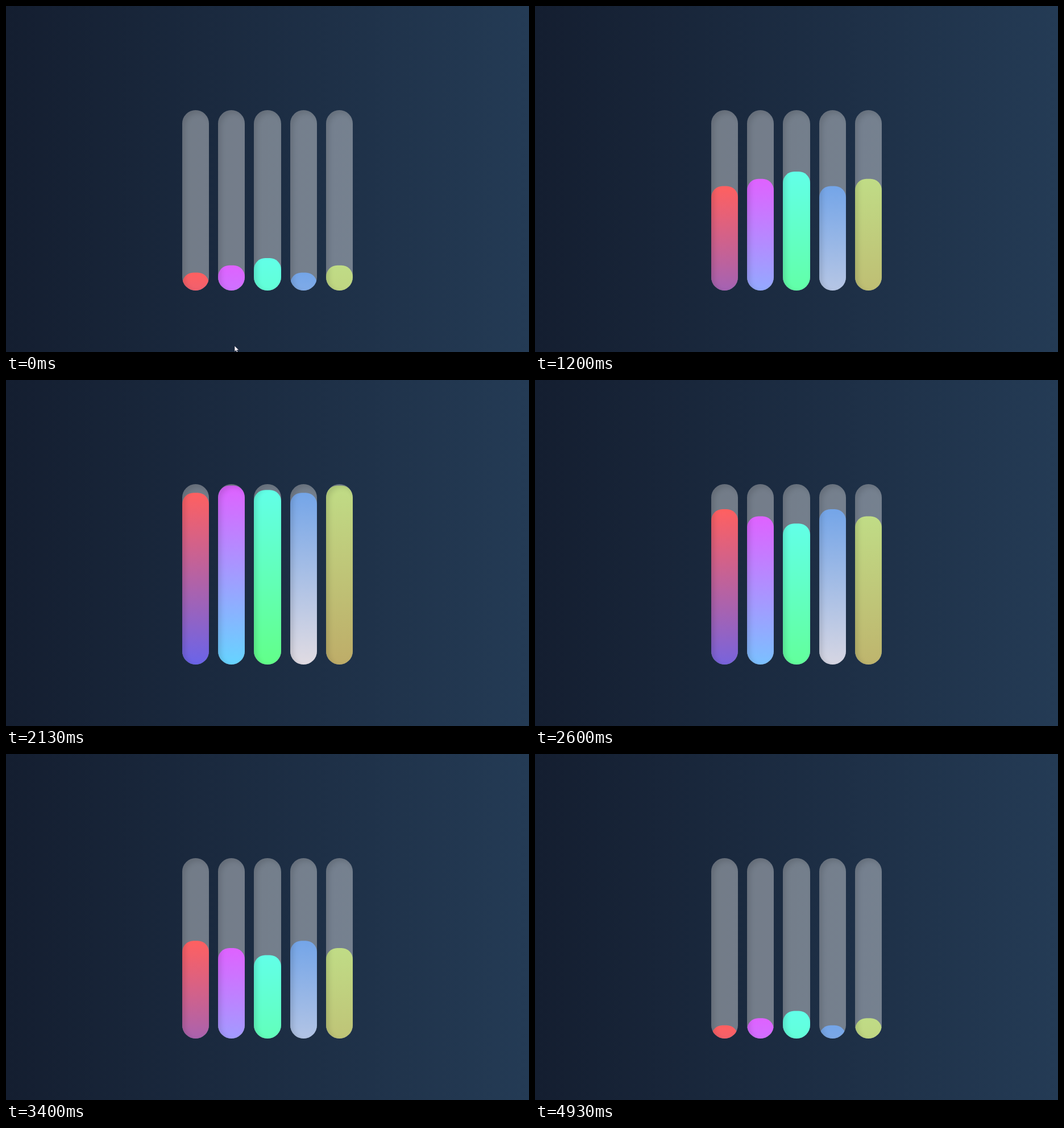
Write an HTML page that moves like this. It is 920 by 608 pixels and loops after 4990 ms.

```html
<!DOCTYPE html>
<html lang="en">
<head>
<meta charset="utf-8">
<title>Colour bars</title>
<style>
  @property --n {
    syntax: "<number>";
    inherits: true;
    initial-value: 0;
  }

  html, body {
    margin: 0;
    width: 100%;
    height: 100%;
    overflow: hidden;
  }

  body {
    position: relative;
    background: linear-gradient(to right, #141e30, #243b55);
  }

  /* --n counts the 75 steps of one loop */
  .bars {
    --em: 15.8333px;
    position: absolute;
    left: 309.6px;
    top: 183px;
    display: flex;
    gap: var(--em);
    animation: count 4990ms steps(75) -6ms infinite;
  }

  .tube {
    position: relative;
    width: calc(3 * var(--em));
    height: calc(20 * var(--em));
    border-radius: calc(1.5 * var(--em));
    background: rgba(255, 255, 255, .39);
    overflow: hidden;
  }

  .tube::after {
    content: "";
    position: absolute;
    inset: 0;
    border-radius: inherit;
    box-shadow: inset 5px 5px 10px rgba(0, 0, 0, .13);
  }

  /* Triangle wave: full at step --peak, empty half a loop away */
  .fill {
    --d: max(var(--n) - var(--peak), var(--peak) - var(--n));
    height: 100%;
    border-radius: calc(1.25 * var(--em));
    background: linear-gradient(var(--top), var(--end));
    transform: translateY(calc(min(var(--d), 75 - var(--d)) / 37.5 * 100%));
  }

  .red    { --peak: 33.8; --top: #ff6060; --end: #6264f0; }
  .purple { --peak: 32.3; --top: #df62ff; --end: #65d5ff; }
  .mint   { --peak: 30.8; --top: #62ffe8; --end: #62ff86; }
  .blue   { --peak: 33.8; --top: #74a5e8; --end: #e6dee2; }
  .olive  { --peak: 32.3; --top: #c0dc86; --end: #beac68; }

  .pointer {
    position: absolute;
    left: 0;
    top: 0;
    overflow: visible;
    animation: leave 4990ms step-end infinite;
  }

  @keyframes count {
    from { --n: 0; }
    to { --n: 75; }
  }

  @keyframes leave {
    0% { transform: translate(402px, 597px); }
    1.4% { transform: translate(336px, 601px); }
    2.6% { transform: translate(271px, 605px); }
    4%, 100% { transform: translate(271px, 640px); }
  }
</style>
</head>
<body>
  <div class="bars">
    <div class="tube"><div class="fill red"></div></div>
    <div class="tube"><div class="fill purple"></div></div>
    <div class="tube"><div class="fill mint"></div></div>
    <div class="tube"><div class="fill blue"></div></div>
    <div class="tube"><div class="fill olive"></div></div>
  </div>
  <svg class="pointer" width="9" height="13">
    <path d="M0 0V10.5L2.5 8.3 4.2 12.3 6 11.5 4.4 7.7H7.8Z" fill="#f6eef4" stroke="#10182a" stroke-width=".6"/>
  </svg>
</body>
</html>
```
